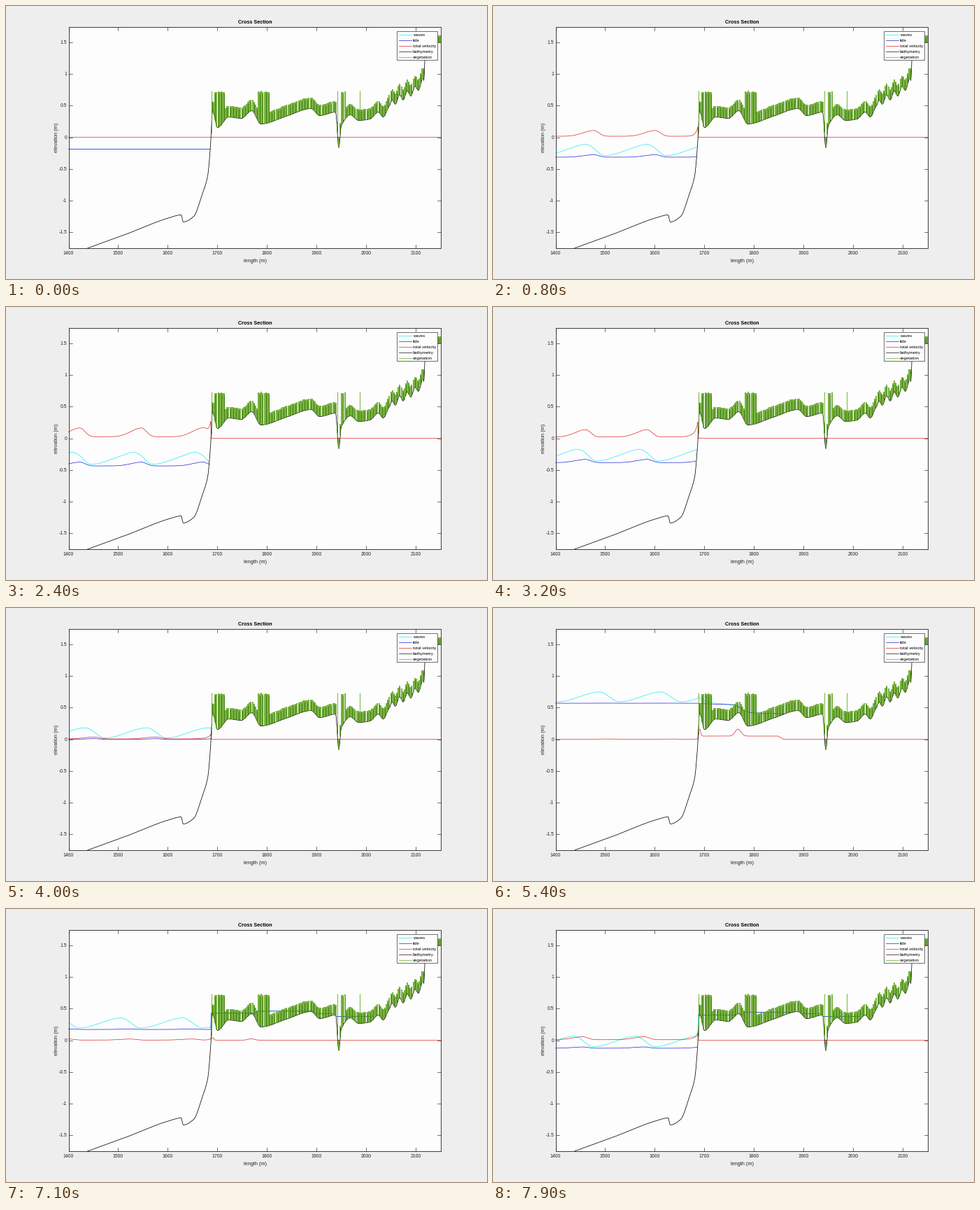
These frames come from a looping animation (688 by 390 pixels, 8 s). A matplotlib script:

```python
import numpy as np
import matplotlib.pyplot as plt
from matplotlib.animation import FuncAnimation
from matplotlib.patches import Rectangle

W, H, DPI = 688, 390, 100
FRAMES, INTERVAL = 80, 100
HOLDS = (27, 43, 47)              # steps that repeat the one before
LEFT, RIGHT, TOP, BOTTOM = 89, 621, 30, 346
ZERO, SHORE, UNIT = 188, 293, 316 / 3.5
WAVELENGTH = 88
INK, CYAN, BLUE, RED, GREEN = "#262626", "#10e8f0", "#1010d8", "#e01818", "#58a012"
PT = 72 / DPI
LINE = 0.65


def curve(keys, x):
    """Smooth curve through key points, without overshoot."""
    px, py = np.array(keys, float).T
    h = np.diff(px)
    s = np.diff(py) / h
    a, b = s[:-1], s[1:]
    same = a * b > 0
    mid = np.where(same, 2 * a * b / np.where(same, a + b, 1), 0)
    m = np.concatenate([s[:1], mid, s[-1:]])
    x = np.clip(x, px[0], px[-1])
    k = np.clip(np.searchsorted(px, x, side="right") - 1, 0, len(h) - 1)
    u = (x - px[k]) / h[k]
    return (py[k] * (1 + 2 * u) * (1 - u) ** 2 + py[k + 1] * u * u * (3 - 2 * u)
            + h[k] * u * (1 - u) * (m[k] * (1 - u) - m[k + 1] * u))


def ease(u):
    u = np.clip(u, 0, 1)
    return u * u * (3 - 2 * u)


def bell(x, centre, width):
    return np.exp(-((x - centre) / width) ** 2)


# --- ground, in pixels ---
seabed = [(112, 348), (170, 327), (233, 303), (250, 299), (253, 309), (268, 301),
          (280, 270), (288, 243), (292, 200), (295, 150)]
marsh = [(302, 174), (318, 159), (336, 161), (351, 150), (364, 169), (400, 158),
         (436, 147), (448, 157), (471, 152), (475.5, 203), (479, 172), (492, 156),
         (504, 164), (520, 162), (532, 152), (539, 159)]
upland = [(548, 143), (597, 107), (600, 52), (622, 52)]


def ground(x):
    ripple = 5 * np.sin(2 * np.pi * (x - 565) / 11)
    return curve(seabed + marsh + upland, x) + ripple * ((x > 548) & (x < 597))


# --- tide and waves ---
TIDE = [(0, -0.19), (1.6, -0.39), (2.4, -0.42), (3.2, -0.37), (4, 0), (5.4, 0.57),
        (6.4, 0.39), (7.9, -0.12)]
CREST = [(0, 100), (1.6, 158), (3.2, 206), (4, 288), (5.4, 328), (6.4, 392), (7.9, 466)]
# far end and height of each pond, and how far it drains
PONDS = ((358, 147, 5), (440, 145, 3), (468, 149.5, 0.5), (622, 154, 0))

x = np.arange(LEFT, RIGHT + 0.1, 0.5)
bed = ground(x)
on_marsh = x >= SHORE


def swell(crest):
    """Wave train with long backs and steep fronts, 0 to 1."""
    u = (crest - x) / WAVELENGTH % 1
    return np.where(u < 0.68, ease(1 - u / 0.68), ease((u - 0.68) / 0.32))


def pond_surface(t):
    u = ease(t - 5.4)
    inflow = 137 + 11 / (1 + np.exp((355 - x) / 4)) + 0.03 * (x - SHORE)
    drained = max(0, (t - 6.4) / 1.5)
    inside = [x < end for end, _, _ in PONDS]
    still = np.select(inside, [y + drop * drained for _, y, drop in PONDS])
    return (1 - u) * inflow + u * still


def marsh_flow(t):
    u = ease(t - 5.4)
    fade = 1 - ease((t - 6.4) / 1.2)
    sheet = 4 * (1 - u) + 0.5
    return fade * (10 * bell(x, 295, 2) + sheet + (10 - 5 * u) * bell(x, 350, 6))


def lines_at(t):
    height = float(curve(TIDE, t))
    level = ZERO - UNIT * height
    crest = float(curve(CREST, t))
    grow = min(1, t / 0.4)
    shallow = grow * 1.2 * np.exp(-3.6 * height)   # low water steepens the surge
    surge = swell(crest + 14) ** 3

    tide = level + shallow * (0.3 - surge)
    wave = tide - grow * (2 + 14 * swell(crest))
    flow = ZERO - shallow * (0.4 + 2.3 * surge + 4 * np.exp((x - SHORE) / 3).clip(0, 1))

    front = np.interp(t, [4.7, 5.4, 6], [SHORE, 415, 523])
    wet = x <= front
    pool = pond_surface(t) + (max(level - 136.5, 0) if t < 5.4 else 0)
    runup = 9 * np.exp(-(x - SHORE).clip(0) / 12) * (level < 156)
    taper = np.clip((front - x) / 8, 0, 1)

    tide = np.where(on_marsh, pool, tide)
    wave = np.where(on_marsh, pool - runup, wave)
    flow = np.where(on_marsh, ZERO - taper * marsh_flow(t), flow)

    def above_ground(y):
        return np.where((on_marsh & ~wet) | (y >= bed), np.nan, y)

    return above_ground(wave), above_ground(tide), flow


# --- stage ---
fig = plt.figure(figsize=(W / DPI, H / DPI), dpi=DPI, facecolor="#eeeeee")
ax = fig.add_axes([0, 0, 1, 1])
ax.set_xlim(-0.5, W - 0.5)
ax.set_ylim(H + 0.5, 0.5)
ax.axis("off")


def label(px, py, text, size, **kw):
    kw = {"ha": "center", "va": "center", "color": INK, **kw}
    ax.text(px, py, text, fontsize=size * PT, family="Liberation Sans", **kw)


def stroke(xs, ys, color, width=LINE, z=3):
    return ax.plot(xs, ys, color=color, lw=width * PT, zorder=z,
                   solid_joinstyle="round")[0]


def box(x0, y0, x1, y1, z, face="#fdfdfd"):
    patch = Rectangle((x0, y0), x1 - x0, y1 - y0, fc=face, ec=INK,
                      lw=LINE * PT, zorder=z)
    ax.add_patch(patch)
    return patch


frame = box(LEFT, TOP, RIGHT, BOTTOM, 1)
box(LEFT, TOP, RIGHT, BOTTOM, 8, face="none")
stroke([-1, W], [H, H], "#0a0a0a", 1, 1)

for m in range(1400, 2101, 100):
    px = LEFT + (m - 1400) * (RIGHT - LEFT) / 750
    stroke([px, px], [BOTTOM, BOTTOM - 5], INK, z=8)
    stroke([px, px], [TOP, TOP + 5], INK, z=8)
    label(px, 354.3, str(m), 6.9)
for k in range(-3, 4):
    py = ZERO - k / 2 * UNIT
    stroke([LEFT, LEFT + 5], [py, py], INK, z=8)
    stroke([RIGHT - 5, RIGHT], [py, py], INK, z=8)
    label(86.5, py + 0.5, f"{k / 2:g}", 6.9, ha="right")

label(355.5, 24.3, "Cross Section", 7.3, weight="bold", color="black")
label(355.5, 364.8, "length (m)", 7.4)
label(71.5, 188, "elevation (m)", 7.4, rotation=90)

land = np.arange(112, RIGHT, 0.5)
stroke(land, ground(land), "black", 0.75, 5).set_clip_path(frame)

# --- plants ---
rng = np.random.default_rng(4)
stems = np.concatenate([np.arange(294.5, 599, 2.13), np.arange(616.5, 621, 2.13)])
foot = ground(stems)
tip = foot - np.where(stems < 600, 15.5, 9) - rng.uniform(-0.5, 0.5, len(stems))
for a, b in ((298.5, 312.5), (359.5, 375.5), (479, 485.5)):
    tall = (stems > a) & (stems < b)
    tip[tall] = 122 + rng.uniform(-0.5, 2, tall.sum())
spikes = np.array([293, 473, 505.5])
ax.vlines(stems, tip, foot, color=GREEN, lw=1.6 * PT, zorder=6)
ax.vlines(stems[::2], tip[::2] + 2, foot[::2], color="#34700a", lw=0.8 * PT, zorder=6)
ax.vlines(spikes, 121, ground(spikes), color=GREEN, lw=0.8 * PT, zorder=6)

# --- legend ---
box(558, 36, 616, 77, 9)
entries = (("waves", CYAN), ("tide", BLUE), ("total velocity", RED),
           ("bathymetry", "black"), ("vegetation", GREEN))
for k, (name, color) in enumerate(entries):
    py = 41 + 8 * k
    stroke([561, 579], [py, py], color, z=10)
    label(581.5, py + 2.4, name, 6, ha="left", va="baseline", color="black", zorder=10)

moving = [stroke([], [], color, z=z) for color, z in ((CYAN, 2), (BLUE, 3), (RED, 4))]


def update(i):
    step = i - 1 if i in HOLDS else i
    for line, y in zip(moving, lines_at(step * INTERVAL / 1000)):
        line.set_data(x, y)
    return moving


anim = FuncAnimation(fig, update, frames=FRAMES, interval=INTERVAL,
                     repeat=True, repeat_delay=0)
plt.show()
```
